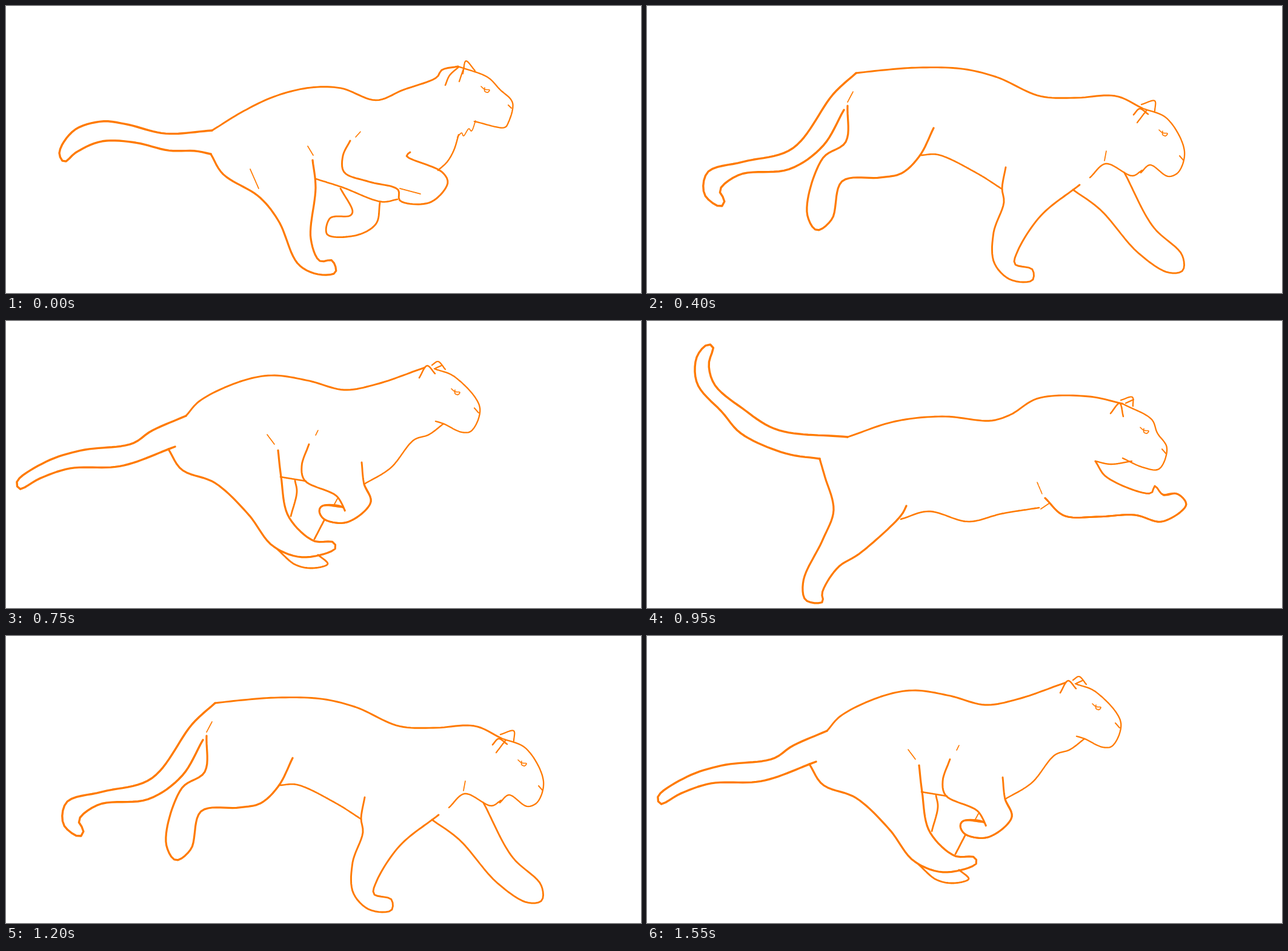
These frames come from a looping animation (1048x475 px, 1.6 s). An HTML page:

```html
<!DOCTYPE html>
<html lang="en">
<head>
<meta charset="utf-8">
<title>Running big cat</title>
<style>
  html, body { margin: 0; width: 100%; height: 100%; overflow: hidden; background: #fff; }
  svg { display: block; width: 100%; height: 100%; }
  path { fill: none; stroke: #ff7a00; stroke-linecap: round; stroke-linejoin: round; }
</style>
</head>
<body>
<svg id="stage" viewBox="0 0 1048 475"></svg>
<script>
const STEP = 50, CYCLE = 16, SAMPLES = 80;
const MAIN = { drive: 0, leap: 3, reach: 5, land: 8, pass: 10, gather: 15 };
const EXTRA = { swing: 2, stretch: 6, sweep: 12 };
const TIMES = { ...MAIN, ...EXTRA };

const stage = document.getElementById("stage");
const parts = [];
const mix = (a, b, t) => a + (b - a) * t;
const gap = (p, q) => Math.hypot(q[0] - p[0], q[1] - p[1]);
const each = f => [f(0), f(1)];

// Cubic from b to c with end slopes mb and mc.
function hermite(b, c, mb, mc, t) {
  const u = 1 - t;
  return b * (1 + 2 * t) * u * u + mb * t * u * u + c * t * t * (3 - 2 * t) - mc * t * t * u;
}

// Centripetal spline through the points.
function smooth(points) {
  const last = points.length - 1;
  const h = points.slice(1).map((p, i) => Math.sqrt(gap(points[i], p)));
  const slope = (i, n) => {
    const left = i > 0 && (points[i][n] - points[i - 1][n]) / h[i - 1];
    const right = i < last && (points[i + 1][n] - points[i][n]) / h[i];
    if (i === 0) return right;
    if (i === last) return left;
    return (left * h[i] + right * h[i - 1]) / (h[i - 1] + h[i]);
  };
  const out = [points[0]];
  for (let i = 0; i < last; i++)
    for (let k = 1; k <= 12; k++)
      out.push(each(n => hermite(points[i][n], points[i + 1][n],
        slope(i, n) * h[i], slope(i + 1, n) * h[i], k / 12)));
  return out;
}

// Evenly spaced points along the smoothed stroke.
function resample(points) {
  const line = smooth(points), dist = [0], out = [];
  for (let i = 1; i < line.length; i++) dist.push(dist[i - 1] + gap(line[i - 1], line[i]));
  const total = dist[dist.length - 1];
  for (let s = 0, i = 1; s < SAMPLES; s++) {
    const want = total * s / (SAMPLES - 1);
    while (i < line.length - 1 && dist[i] < want) i++;
    const t = (want - dist[i - 1]) / (dist[i] - dist[i - 1] || 1);
    out.push(each(n => mix(line[i - 1][n], line[i][n], t)));
  }
  return out;
}

function parse(text) {
  const nums = text.split(" ").map(Number), points = [];
  while (nums.length) points.push(nums.splice(0, 2));
  return points;
}

// One pen stroke; main poses that are not given leave it hidden.
function part(width) {
  const path = document.createElementNS("http://www.w3.org/2000/svg", "path");
  path.setAttribute("stroke-width", width);
  stage.appendChild(path);
  const shapes = {};
  const self = {
    path,
    at(name, text, x = 0, y = 0) {
      shapes[name] = resample(parse(text).map(p => [p[0] + x, p[1] + y]));
      return self;
    },
    keys: () => Object.keys(TIMES).filter(n => n in MAIN || shapes[n])
      .map(n => ({ at: TIMES[n], shape: shapes[n] })).sort((a, b) => a.at - b.at)
  };
  parts.push(self);
  return self;
}

// Tail: upper root, tip, lower root
part(3.4)
  .at("drive", "340 206 262 211 200 196 158 191 112 206 88 243 96 258 116 242 158 224 213 226 268 239 313 240 338 245")
  .at("swing", "335 197 250 197 150 156 72 92 59 104 90 153 160 206 230 226 290 231")
  .at("leap", "331 192 215 180 158 145 112 106 102 72 109 42 100 39 82 60 83 104 125 152 155 186 228 219 285 228")
  .at("reach", "370 153 325 138 262 163 190 179 160 166 170 139 211 135 196 119 158 121 134 172 167 201 235 200 322 178")
  .at("land", "345 111 308 145 240 236 158 258 100 275 95 312 122 332 128 322 120 305 153 279 235 270 290 232 325 172")
  .at("pass", "316 123 266 215 225 268 214 307 250 337 285 328 277 321 240 315 235 293 283 256 327 166")
  .at("gather", "297 157 240 182 208 203 125 214 68 232 18 266 22 278 55 261 105 244 190 240 279 208");

// Back
part(2.9)
  .at("drive", "340 206 392 174 445 149 503 135 553 136 611 156 655 139 711 118 719 106 746 100")
  .at("leap", "331 192 410 166 490 158 567 165 600 155 645 128 730 125 785 137")
  .at("reach", "362 162 370 153 420 146 527 128 590 138 650 133 695 121 775 137 817 162")
  .at("land", "345 111 381 107 445 102 520 104 578 118 648 149 707 152 774 149 817 169")
  .at("pass", "316 123 360 103 470 89 540 97 612 137 675 159 735 146 803 158")
  .at("gather", "297 157 320 132 390 99 440 90 500 99 558 114 610 105 691 77");

// Face: crown, nose, throat
part(2.3)
  .at("drive", "746 100 795 118 815 138 836 160 829 193 823 201 773 191")
  .at("leap", "785 137 833 163 842 185 858 210 845 245 818 242 785 227")
  .at("reach", "817 162 873 198 879 220 891 242 876 279 845 267 795 268")
  .at("land", "817 169 858 186 887 240 877 275 860 282 830 263 815 276")
  .at("pass", "803 158 843 180 872 221 865 262 853 266 811 248 801 262")
  .at("gather", "707 79 740 92 782 143 768 182 752 184 722 170 709 166");

// Nostril
part(2)
  .at("drive", "829 164 834 169").at("leap", "850 212 857 220").at("reach", "884 242 889 250")
  .at("land", "879 248 885 255").at("pass", "866 229 870 234").at("gather", "773 144 780 152");

// Eye
const EYE = "-7 -5 -1 0 7 1 4 5 -1 3 -1 -3";
part(1.6)
  .at("drive", EYE, 791, 138).at("leap", EYE, 821, 181).at("reach", EYE, 858, 211)
  .at("land", EYE, 852, 210).at("pass", EYE, 835, 198).at("gather", EYE, 742, 117);

// Near ear
part(2.5)
  .at("drive", "725 131 732 115 747 101").at("leap", "765 153 780 136 786 158")
  .at("reach", "804 184 818 162 830 165 831 180").at("land", "803 180 813 170 827 179")
  .at("pass", "777 168 788 156 800 156").at("gather", "682 94 695 74 708 87");

// Inner ear
part(2.2)
  .at("drive", "748 125 756 101").at("leap", "790 136 803 130").at("reach", "822 191 830 168")
  .at("land", "809 193 825 172").at("pass", "795 182 803 163").at("gather", "709 78 718 74");

// Far ear
part(2.2)
  .at("drive", "754 112 759 91 774 107").at("leap", "782 131 801 126 802 141")
  .at("reach", "820 160 843 158 848 174").at("land", "816 163 838 157 838 174")
  .at("pass", "801 155 814 151 822 166").at("gather", "703 73 713 67 725 80");

// Chest
part(2.4)
  .at("drive", "747 213 739 239 728 258 713 272").at("leap", "800 232 765 237 740 232")
  .at("reach", "766 235 786 263 796 259").at("land", "817 272 801 281 757 261 731 284")
  .at("pass", "785 267 752 263 737 271").at("gather", "722 170 698 188 673 197 635 243 591 270");

// Throat fur
part(1.7)
  .at("drive", "775 190 768 207 764 203 755 215 752 210 745 217").at("reach", "768 263 779 254")
  .at("land", "755 256 758 240").at("pass", "786 266 791 254");

// Belly
part(2.6)
  .at("drive", "511 286 555 300 620 324 646 320").at("leap", "419 328 465 315 530 332 585 319 647 309")
  .at("reach", "414 274 437 268 550 283 667 284").at("land", "452 247 480 246 545 277 586 303")
  .at("pass", "486 227 510 264 558 295").at("gather", "453 258 495 265");

// Near foreleg: front edge, paw, rear edge
part(2.9)
  .at("drive", "667 242 661 248 720 275 729 293 700 325 650 322 647 304 600 291 558 275 556 248 568 223")
  .at("leap", "740 232 758 258 832 285 838 273 852 288 875 286 890 304 850 332 805 321 743 324 688 322 657 293")
  .at("reach", "766 249 761 295 788 357 816 407 842 407 856 433 830 441 790 432 750 393 756 390 733 366 692 318")
  .at("land", "714 296 650 347 612 405 607 427 636 436 636 454 600 453 573 425 572 375 589 325 586 302 592 267")
  .at("pass", "737 271 705 284 660 311 615 346 550 408 515 434 478 440 490 405 517 393 545 320 562 295")
  .at("gather", "587 234 591 270 602 300 563 333 525 328 517 314 522 306 556 308 560 316 546 290 493 264 488 240 500 204");

// Far foreleg: rear edge, paw, front edge
part(2.8)
  .at("drive", "552 302 572 340 568 347 535 351 530 378 580 379 611 360 617 326")
  .at("leap", "657 293 688 322 743 324 805 321 850 332 890 304 875 286 852 288")
  .at("reach", "763 312 815 310 865 329 888 327 898 312 877 279")
  .at("stretch", "748 316 830 340 905 380 945 370 915 335 830 282")
  .at("land", "703 304 748 337 810 408 860 441 884 438 883 412 835 365 788 276")
  .at("pass", "645 325 648 346 668 370 682 410 733 460 777 455 770 431 748 431 725 350 738 271")
  .at("sweep", "590 320 575 430 595 442 635 435 632 400 670 292")
  .at("gather", "556 308 522 306 517 314 525 328 563 333 602 300 591 270");

// Shoulder
part(1.6)
  .at("drive", "577 217 585 208").at("leap", "652 286 644 267")
  .at("reach", "673 291 647 251").at("gather", "511 189 515 181");

// Elbow
part(1.8)
  .at("drive", "650 302 684 311").at("leap", "650 311 665 301")
  .at("reach", "680 295 686 313").at("gather", "541 305 547 294");

// Hind leg: rear edge, paw, front edge
part(3.2)
  .at("drive", "338 245 358 278 418 316 450 356 482 427 515 444 544 441 538 421 518 422 503 385 511 300 506 255")
  .at("leap", "285 228 293 256 308 313 290 362 258 430 262 462 290 465 289 450 315 408 352 384 420 321 428 306")
  .at("reach", "322 178 309 225 290 280 255 336 223 398 238 431 250 420 260 386 293 356 350 325 402 279 414 274")
  .at("land", "331 165 328 225 290 252 264 342 280 371 305 353 322 290 385 284 420 277 450 248 473 202")
  .at("pass", "332 158 333 168 357 210 350 242 318 252 337 306 370 367 379 345 368 298 386 274 440 267 478 237")
  .at("gather", "268 212 290 246 345 268 400 320 440 372 490 391 544 376 540 366 508 364 466 323 454 258 449 214");

// Thigh, hip and flank marks
part(1.7).at("drive", "507 247 498 232").at("pass", "481 231 490 222").at("gather", "443 204 431 188");
part(1.7).at("drive", "403 270 417 302").at("land", "331 159 340 142");
part(1.7).at("pass", "481 222 488 229");

// Far hind leg
part(2.8).at("gather", "448 378 477 403 505 409 531 402 515 387");
part(2.8).at("gather", "477 264 480 283 470 323");
part(2.8).at("gather", "525 330 509 361");

function poseAt(keys, step) {
  const count = keys.length;
  const key = i => {
    const lap = Math.floor(i / count), k = keys[i - lap * count];
    return { at: k.at + lap * CYCLE, shape: k.shape };
  };
  let i = 0;
  while (key(i + 1).at <= step) i++;
  const b = key(i), c = key(i + 1), span = c.at - b.at, t = (step - b.at) / span;
  if (t === 0) return b.shape;
  if (!b.shape || !c.shape) return t <= .5 ? b.shape : c.shape;
  let a = key(i - 1), d = key(i + 2);
  if (!a.shape) a = b;
  if (!d.shape) d = c;
  const before = span / (c.at - a.at), after = span / (d.at - b.at);
  return b.shape.map((p, j) => each(n => hermite(p[n], c.shape[j][n],
    (c.shape[j][n] - a.shape[j][n]) * before, (d.shape[j][n] - p[n]) * after, t)));
}

const toPath = shape => shape ? "M" + shape.map(p => p.map(v => v.toFixed(1)).join(" ")).join("L") : "";
const strokes = parts.map(p => ({ path: p.path, keys: p.keys() }));

let shown = -1;
function draw(time) {
  const step = Math.floor(Math.max(0, time) / STEP) % CYCLE;
  if (step === shown) return;
  shown = step;
  for (const { path, keys } of strokes) path.setAttribute("d", toPath(poseAt(keys, step)));
}

const start = performance.now();
function tick(now) {
  draw(now - start);
  requestAnimationFrame(tick);
}
draw(0);
requestAnimationFrame(tick);
</script>
</body>
</html>
```
